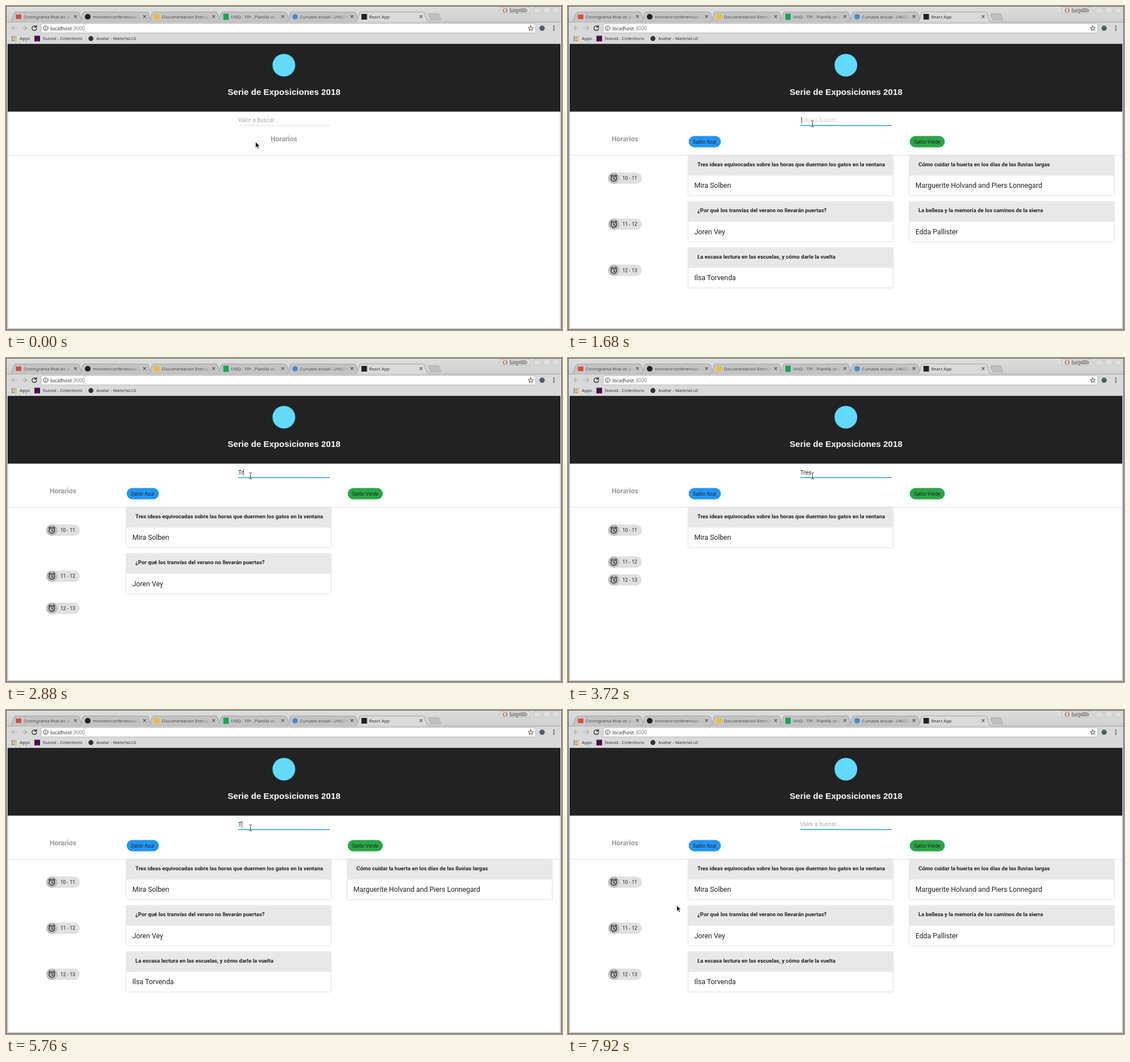
An HTML page for the animation above (8000 ms loop, 979 by 572 pixels).

```html
<!DOCTYPE html>
<html lang="es">
<head>
<meta charset="utf-8">
<title>React App</title>
<style>
  html, body { margin: 0; width: 100%; height: 100%; overflow: hidden; background: #fff; }
  svg { display: block; }
  text { white-space: pre; }
  .ui { font: 7.65px "Noto Sans", sans-serif; fill: #333; }
  .url { font: 9px "Noto Sans", sans-serif; fill: #333; }
  .heading { font: bold 15.15px "Liberation Sans", Arial, sans-serif; fill: #fff; text-anchor: middle; }
  .hours { font: bold 12.1px Roboto, sans-serif; fill: #9b9b9b; text-anchor: middle; }
  .field { font: 10px Roboto, sans-serif; fill: #222; }
  .chip { font: 8.7px Roboto, sans-serif; fill: #222; }
  .talk { font: bold 9.6px Roboto, sans-serif; fill: #222; }
  .speaker { font: 12.3px Roboto, sans-serif; fill: #222; }
  .card { filter: drop-shadow(0 .8px .9px rgba(0, 0, 0, .3)); }
  .line { fill: none; stroke: #333; stroke-linecap: round; stroke-linejoin: round; }
</style>
</head>
<body>
<svg id="stage" width="979" height="572" viewBox="0 0 979 572">
  <defs>
    <linearGradient id="frame" x2="0" y2="1">
      <stop stop-color="#dedede"/><stop offset="1" stop-color="#cfcfcf"/>
    </linearGradient>
    <linearGradient id="fade" gradientUnits="userSpaceOnUse" x1="98" x2="116">
      <stop stop-color="#4a4a4a"/><stop offset="1" stop-color="#4a4a4a" stop-opacity="0"/>
    </linearGradient>
    <g id="clock">
      <rect x="70.5" y="-10" width="59.5" height="20" rx="10" fill="#e0e0e0"/>
      <circle cx="80.7" r="10" fill="#bdbdbd"/>
      <g class="line" stroke-width="1.2" style="stroke:#1a1a1a">
        <circle cx="80.7" cy=".6" r="4.9"/>
        <path d="M80.7-2.2V.9l2.2 1.4M75.2-3.7l2.6-2.2M86.2-3.7l-2.6-2.2"/>
      </g>
    </g>
  </defs>
  <g id="browser"></g>
  <g id="page"></g>
  <g id="pointer"></g>
</svg>
<script>
const LOOP = 8000, STEP = 120;
const $ = id => document.getElementById(id);
const rect = (x, y, w, h, fill, extra = '') =>
  `<rect x="${x}" y="${y}" width="${w}" height="${h}" fill="${fill}" ${extra}/>`;
const dot = (x, y, r, fill) => `<circle cx="${x}" cy="${y}" r="${r}" fill="${fill}"/>`;
const label = (cls, x, y, str, extra = '') => `<text class="${cls}" x="${x}" y="${y}" ${extra}>${str}</text>`;
const line = (d, width = 1, color = '#333') =>
  `<path class="line" d="${d}" stroke-width="${width}" style="stroke:${color}"/>`;

const tabs = [
  ['Cronograma final de proyectos', rect(17.5, 15, 9.5, 8, '#dd4b39')],
  ['mrolven/conferencias-React', dot(22.2, 19, 5, '#222')],
  ['Documentación Entrega final', dot(22.2, 19, 4.8, '#f4bf2c')],
  ['UNQ - TIP - Planilla de proyectos', rect(17.5, 13.5, 9.5, 11, '#18a45c')],
  ['Cursada actual - UNQUI', dot(22.2, 19, 4.8, '#4a8bd0')],
  ['React App', rect(17.3, 14, 9.8, 10, '#222')],
];

function tab([title, icon], i) {
  const active = i === tabs.length - 1;
  const d = 'M5 28.5C9 28 9 27 10 25L14 13Q15 10.5 17 10.5H126Q128 10.5 129 13L133 25C134 27 134 28 138 28.5';
  return `<g transform="translate(${121.7 * i})">
    <path d="${d}" fill="${active ? '#dadada' : '#c4c4c4'}" stroke="#999" stroke-width=".8"/>
    ${icon}${label('ui', 31, 21.5, title, `style="fill:${active ? '#333' : 'url(#fade)'}"`)}
    ${line('M120.2 16.5l4.2 4.2m0-4.2l-4.2 4.2', 1.1, '#555')}</g>`;
}

function browser() {
  const appColors = ['#db4437', '#db4437', '#f4a300', '#0f9d58', '#4285f4', '#f4a300', '#0f9d58', '#db4437', '#f4a300'];
  return rect(0, 0, 979, 572, '#cfcfcf') + rect(0, 0, 979, 28.5, 'url(#frame)')
    + rect(.5, .5, 978, 571, 'none', 'stroke="#555"')
    + rect(869.5, 2.5, 55, 10.5, '#dcdcdc', 'rx="2" stroke="#b8b8b8" stroke-width=".8"')
    + line('M877.5 4.8q-4 3 0 6M880.5 4.8q4 3 0 6', 1.3, '#cf3a32')
    + label('ui', 887, 10.3, 'Leopoldo', 'style="font-size:6.6px;font-weight:bold;fill:#fff;stroke:#444;stroke-width:1.3px;paint-order:stroke"')
    + [929, 945.5, 962].map(x => rect(x, 2.5, 14, 10.5, '#dadada', 'rx="2" stroke="#c2c2c2" stroke-width=".8"')).join('')
    + line('M933.5 9h5M950 5.5h5v4.5h-5zM966.8 5.5l4.5 4.5m0-4.5l-4.5 4.5', 1, '#f2f2f2')
    + rect(1, 28, 977, 39, '#d9d9d9') + line('M1 28.5H978', .8, '#999')
    + tabs.map(tab).join('')
    + '<path d="M743.5 14.5q.5-1 2-1h15q1.500 0 2 1l3 9q.5 1.500-1 1.500h-15q-1.500 0-2-1.500z" fill="#bebebe" stroke="#a5a5a5" stroke-width=".7"/>'
    + line('M18.500 39H10.500M14 35.500L10.500 39l3.500 3.500M28.500 39h8M33 35.500l3.500 3.500-3.500 3.500', 1.2, '#aaa')
    + line('M53 36.800A4 4 0 1 0 53.700 40M53.700 34.500v3h-3', 1.4)
    + rect(62, 31, 870.5, 16.5, '#fff', 'rx="2" stroke="#aaa" stroke-width=".8"')
    + '<circle class="line" cx="70" cy="39.200" r="4" stroke-width=".9"/>' + line('M70 38.700v2.500M70 36.900v.1', 1)
    + `<text class="url" x="78" y="42.500">localhost<tspan fill="#777">:3000</tspan></text>`
    + line('M924 34.800l1.300 2.900 3.100.3-2.400 2.100.8 3.100-2.800-1.700-2.800 1.700.8-3.100-2.400-2.100 3.100-.3z', .9)
    + dot(944, 39.2, 4.6, '#46606c')
    + [35.7, 39.2, 42.7].map(y => dot(964.7, y, 1.1, '#333')).join('')
    + appColors.map((c, i) => rect(10 + i % 3 * 3.4, 53.5 + Math.floor(i / 3) * 3.2, 2, 2, c)).join('')
    + label('ui', 24.3, 60, 'Apps')
    + rect(50, 52.5, 10, 10, '#4b1248') + label('ui', 64.8, 60, 'Nuvod - Collections')
    + dot(149.5, 57.5, 4.4, '#333') + label('ui', 159, 60, 'Avatar - Material-UI')
    + rect(3, 67, 973, 502.5, '#fff', 'stroke="#999" stroke-width=".7"')
    + rect(3, 67, 973, 119.5, '#222')
    + dot(489.3, 104.5, 20, '#61dafb')
    + label('heading', 489.5, 156.5, 'Serie de Exposiciones 2018')
    + rect(3, 263, 973, .8, '#dcdcdc');
}

const schedule = [
  { hour: '10 - 11', talks: [
    ['Tres ideas equivocadas sobre las horas que duermen los gatos en la ventana', 'Mira Solben'],
    ['Cómo cuidar la huerta en los días de las lluvias largas', 'Marguerite Holvand and Piers Lonnegard']] },
  { hour: '11 - 12', talks: [
    ['¿Por qué los tranvías del verano no llevarán puertas?', 'Joren Vey'],
    ['La belleza y la memoria de los caminos de la sierra', 'Edda Pallister']] },
  { hour: '12 - 13', talks: [
    ['La escasa lectura en las escuelas, y cómo darle la vuelta', 'Ilsa Torvenda']] },
];

const card = (x, y, [title, speaker]) =>
  `<g class="card">${rect(x, y, 360, 70, '#fff', 'rx="1.300"')}</g>`
  + rect(x, y, 360, 35, '#e8e8e8', 'rx="1.300"')
  + label('talk', x + 15.8, y + 18.6, title) + label('speaker', x + 10.5, y + 56.7, speaker);

function agenda(query) {
  let top = 263.5;
  const rows = schedule.map(({ hour, talks }) => {
    const cards = talks.map((talk, i) =>
      talk[0].toLowerCase().includes(query.toLowerCase()) ? card(212 + 389.3 * i, top + 1, talk) : '').join('');
    const height = cards ? 81.35 : 31.5, mid = top + height / 2;
    top += height;
    return `<use href="#clock" y="${mid - .3}"/>` + label('chip', 95.7, mid + 2.8, hour) + cards;
  });
  const room = (x, w, fill, name) =>
    rect(x, 229.5, w, 20, fill, 'rx="10"') + label('chip', x + 7.5, 242.7, name);
  return label('hours', 100.3, 239.2, 'Horarios') + room(212.5, 56.7, '#2196f3', 'Salón Azul')
    + room(601.7, 61.8, '#28a745', 'Salón Verde') + rows.join('');
}

const FOCUS = 740, LOADED = 1320;
const edits = [[680, ''], [2640, 'T'], [2880, 'Tr'], [3000, 'Tre'], [3120, 'Tres'],
  [4560, 'Tre'], [4920, 'Tr'], [5400, 'T'], [7080, '']];
const caretX = { '': 411.3, T: 415.5, Tr: 418.3, Tre: 423.8, Tres: 429.2 };
const moves = [[0, 439.5, 240], [360, 439.5, 240], [720, 430.5, 208], [7080, 430.5, 208],
  [7560, 801, 434], [7920, 191.5, 345]];

function field(t, [since, query]) {
  const grow = Math.min(1, Math.max(0, (t - FOCUS) / 117));
  const half = 80.7 * (1 - (1 - grow) ** 1);
  const faint = t >= 1560 && t < 1800;
  const caretOn = t >= FOCUS && Math.floor((t - since) / 500) % 2 === 0;
  return rect(408.7, 211, 161.5, .8, '#d0d0d0')
    + (half ? rect(489.4 - half, 210.5, half * 2, 1.4, '#17a2b8') : '')
    + (query ? label('field', 409, 205.8, query)
      : label('field', 408.7, 205, 'Valor a buscar...', `style="fill:${faint ? '#cfcfcf' : '#aaa'}"`))
    + (caretOn ? rect(caretX[query] - .4, 196, .8, 12, '#222') : '');
}

function pointer(t) {
  const i = Math.max(1, moves.findIndex(m => m[0] >= t));
  const [t0, x0, y0] = moves[i - 1], [t1, x1, y1] = moves[i];
  const k = (t - t0) / (t1 - t0), x = x0 + (x1 - x0) * k, y = y0 + (y1 - y0) * k;
  const overField = x > 408 && x < 571 && y < 212;
  const shape = overField
    ? line('M-2-5.500q2 0 2 1V4.500q0 1-2 1M2-5.500q-2 0-2 1M2 5.500q-2 0-2-1', .9)
    : '<path d="M0 0V10l2.300-2.100 1.700 3.800 1.600-.7-1.700-3.700H7z" fill="#111" stroke="#fff" stroke-width=".4"/>';
  return `<g transform="translate(${x} ${y})">${shape}</g>`;
}

$('browser').innerHTML = browser();
let shown = -1;
function draw() {
  const t = Math.floor(performance.now() % LOOP / STEP) * STEP;
  if (t !== shown) {
    shown = t;
    const edit = edits.filter(e => e[0] <= t).pop() || edits[0];
    $('page').innerHTML = field(t, edit)
      + (t < LOADED ? label('hours', 489.3, 239.2, 'Horarios') : agenda(edit[1]));
    $('pointer').innerHTML = pointer(t);
  }
  requestAnimationFrame(draw);
}
draw();
</script>
</body>
</html>
```
